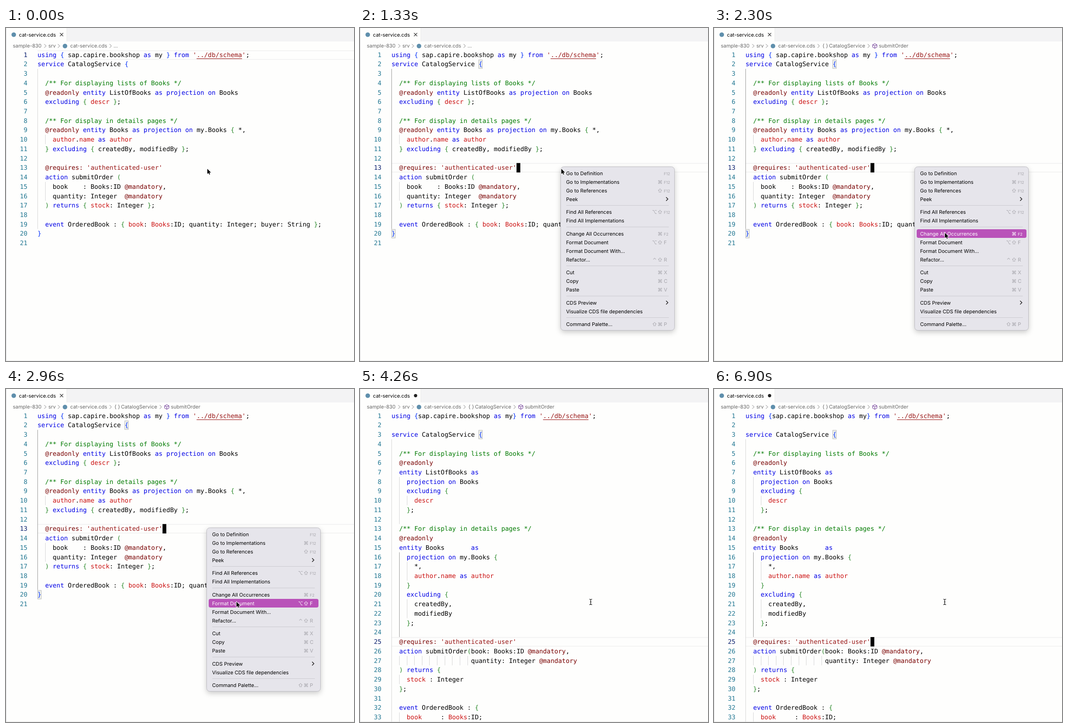
Recreate the animation shown at these times as an HTML page. Size 764 by 733 pixels, loop 6.93 s.

```html
<!DOCTYPE html>
<html lang="en">
<head>
<meta charset="utf-8">
<title>Format document</title>
<style>
  html, body { margin: 0; width: 100%; height: 100%; overflow: hidden; background: #fefefd; }
  svg { display: block; }
  text { text-rendering: geometricPrecision; white-space: pre; }
  .code { font: 13.81px "DejaVu Sans Mono", monospace; }
  .ui { font: 11px Inter, "DejaVu Sans", sans-serif; }
  .num { fill: #237893; text-anchor: end; }
  .num.active { fill: #0b216f; }
  .kw { fill: #0000e6; }
  .rem { fill: #007a00; }
  .ann { fill: #780000; }
  .str { fill: #981515; }
  .ref { fill: #cb1010; }
  .d1 { fill: #0431fa; }
  .d2 { fill: #2b8a2b; }
  .guide { fill: #d6d6d6; }
  .guide.dark { fill: #999; }
  .match { fill: #eef1ee; stroke: #b9b9b9; }
  .crumb { fill: #686868; }
  .thin { fill: none; stroke: #777; }
  .mark { fill: #5f8fac; }
  .panel { fill: #e6e5eb; stroke: #bdbcc2; filter: drop-shadow(0 4px 6px #0003); }
  .key { fill: #a5a4aa; }
  .mod { text-anchor: middle; }
  .arrow { fill: none; stroke: #222; stroke-width: 1.5; }
  .bar { fill: #b952b9; visibility: hidden; }
  .on .bar { visibility: visible; }
  .on text { fill: #fff; }
</style>
</head>
<body>
<svg id="stage" width="764" height="733" viewBox="0 0 764 733"></svg>
<script>
const LOOP = 6930, LEFT = 69.3, CELL = 8.313, TOP = 48.5, ROW = 20.73;
const T = { blink: 560, click: 900, crumbs: 1450, pick: 2980, fade: 3100, gone: 3290, format: 3460 };

const before = `using { sap.capire.bookshop as my } from '../db/schema';
service CatalogService {

  /** For displaying lists of Books */
  @readonly entity ListOfBooks as projection on Books
  excluding { ~descr };

  /** For display in details pages */
  @readonly entity Books as projection on my.Books { *,
    ~author.~name as ~author
  } excluding { createdBy, modifiedBy };

  @requires: 'authenticated-user'
  action submitOrder (
    book    : Books:ID @mandatory,
    quantity: Integer  @mandatory
  ) returns { ~stock: Integer };

  event OrderedBook : { ~book: ~Books:ID; quantity: Integer; buyer: String };
}
`;
const after = `using {sap.capire.bookshop as my} from '../db/schema';

service CatalogService {

  /** For displaying lists of Books */
  @readonly
  entity ListOfBooks as
    projection on Books
    excluding {
      ~descr
    };

  /** For display in details pages */
  @readonly
  entity Books       as
    projection on my.Books {
      *,
      ~author.~name as ~author
    }
    excluding {
      createdBy,
      modifiedBy
    };

  @requires: 'authenticated-user'
  action submitOrder(book: Books:ID @mandatory,
                     quantity: Integer @mandatory
  ) returns {
    ~stock : Integer
  };

  event OrderedBook : {
    ~book     : ~Books:ID;`;

const keywords = /^(using|as|from|service|entity|projection|on|excluding|action|returns|event)$/;
const tokens = /\/\*.*?\*\/|'[^']*'|@\w+:?|~?\w+|[{}()]|[^\s\w{}()@~']+/g;
const x = col => LEFT + col * CELL;
const y = row => TOP + row * ROW;
const text = (px, py, cls, s) => `<text x="${px}" y="${py}" class="${cls}">${s}</text>`;
const rect = (px, py, w, h, attrs) => `<rect x="${px}" y="${py}" width="${w}" height="${h}" ${attrs}/>`;
const group = (id, body) => `<g id="${id}">${body}</g>`;

function codeLines(source) {
  let depth = 0;
  const kind = s => {
    if (/[{(]/.test(s)) return 'd' + ++depth;
    if (/[})]/.test(s)) return 'd' + depth--;
    if (s[0] === '~') return 'ref';
    if (s[0] === '@') return 'ann';
    if (s[0] === "'") return 'str';
    if (s.startsWith('/*')) return 'rem';
    return keywords.test(s) ? 'kw' : '';
  };
  return source.split('\n').map((line, row) => {
    let marks = 0, out = text(47, y(row) + 15.1, 'code num', row + 1);
    for (const m of line.matchAll(tokens)) {
      const px = x(m.index - marks);
      const word = /^\/\*|^'/.test(m[0]) ? m[0] : m[0].replace('~', '');
      // comments and strings stay whole, so only names carry a marker
      const cls = m[0].startsWith('/*') ? 'rem' : m[0][0] === "'" ? 'str' : kind(m[0]);
      out += text(px, y(row) + 15.1, 'code ' + cls, word);
      if (word.includes('../')) out += rect(px + CELL, y(row) + 18.5, 12 * CELL, 1.1, 'class="str"');
      if (m[0][0] === '~') marks++;
    }
    return out;
  }).join('');
}

const guide = (col, from, to, cls = '') =>
  rect(Math.round(x(col)), y(from - 1), 1, (to - from + 1) * ROW, `class="guide ${cls}"`);
const match = (col, row) => rect(x(col) + .2, y(row - 1) + .9, CELL - .4, ROW - 1.8, 'class="match"');

function chrome() {
  const chevron = px => `<path class="thin" d="M${px - 2} 35.5l4 4-4 4"/>`;
  const crumb = (px, s) => text(px, 43.4, 'ui crumb', s);
  return rect(0, 0, 764, 29.5, 'fill="#f3f3f4"') + rect(1, 0, 132.5, 30, 'fill="#fefefd"') +
    rect(133, 0, 1, 29.5, 'fill="#e9e9ea"') + rect(0, 0, 1, 733, 'fill="#dfdfe0"') +
    rect(0, 732, 764, 1, 'fill="#e8e8e8"') +
    '<circle class="mark" cx="17" cy="14.7" r="5"/><circle class="mark" cx="129.5" cy="39.7" r="5"/>' +
    text(28.5, 18.5, 'ui', 'cat-service.cds') +
    group('close', '<path d="M118.5 11l7 7m0-7l-7 7" stroke="#333" stroke-width="1.1"/>') +
    group('dirty', '<circle cx="122" cy="14.6" r="3.6" fill="#222"/>') +
    crumb(15, 'sample-830') + chevron(86) + crumb(93, 'srv') + chevron(116) +
    crumb(141, 'cat-service.cds') + chevron(229.5) +
    group('short', crumb(236, '…')) +
    group('full', crumb(238, '{ }') + crumb(252.5, 'CatalogService') + chevron(339.5) +
      '<path d="M353 34.5l4.7 2.4v5.2L353 44.6l-4.7-2.5v-5.2zM348.3 37l4.7 2.3 4.7-2.3M353 39.3v5.3" fill="none" stroke="#652d90"/>' +
      crumb(362, 'submitOrder'));
}

const items = `Go to Definition| F12
Go to Implementations|⌘ F12
Go to References|⇧ F12
Peek|>
-
Find All References|⌥⇧ F12
Find All Implementations
-
Change All Occurrences|⌘ F2
Format Document|⌥⇧ F
Format Document With...
Refactor...|⌃⇧ R
-
Cut|⌘ X
Copy|⌘ C
Paste|⌘ V
-
CDS Preview|>
Visualize CDS file dependencies
-
Command Palette...|⇧⌘ P`;
const rowTops = [];

function menu() {
  let top = 310, out = rect(440.5, 305.5, 250, 360, 'rx="7" class="panel"');
  for (const item of items.split('\n')) {
    if (item === '-') {
      out += rect(453, top + 4, 225, 1, 'fill="#cbcad0"');
      top += 9.5;
      continue;
    }
    const [label, keys = ''] = item.split('|'), mid = top + 9.5;
    let row = rect(445, top, 241, 19, 'rx="4" class="bar"') + text(452.5, mid + 4, 'ui', label);
    if (keys === '>') row += `<path class="arrow" d="M672 ${mid - 4}l4 4-4 4"/>`;
    else if (keys) {
      const [mods, key] = keys.split(' ');
      [...mods].reverse().forEach((m, i) => row += text(658.7 - 12 * i, mid + 4, 'ui key mod', m));
      const size = key.length > 1 ? 8.5 : 11;
      row += `<text x="667" y="${mid + 4}" class="ui key" style="font-size:${size}px">${key}</text>`;
    }
    out += `<g class="item">${row}</g>`;
    rowTops.push(top);
    top += 19;
  }
  return out;
}

const stage = document.getElementById('stage');
stage.innerHTML = chrome() +
  group('line', rect(69, .5, 700, 1, 'fill="#e9e9e9"') + rect(69, 19.6, 700, 1, 'fill="#e9e9e9"')) +
  group('old', group('idle', guide(0, 3, 19)) +
    group('busy', guide(0, 3, 19, 'dark') + match(23, 2) + match(0, 20)) +
    guide(2, 10, 10) + guide(2, 15, 16) + codeLines(before)) +
  group('neat', guide(0, 4, 33) + guide(2, 8, 12) + guide(2, 16, 24, 'dark') + guide(2, 29, 29) +
    guide(2, 33, 33) + guide(4, 10, 10) + guide(4, 17, 18) + guide(4, 21, 22) +
    Array.from({ length: 10 }, (_, i) => guide(2 + 2 * i, 27, 27)).join('') +
    match(23, 3) + codeLines(after)) +
  group('caret', rect(0, 0, CELL, ROW, '') + '<text id="under" y="15.1" class="code" fill="#fff">;</text>') +
  group('menu', menu()) +
  group('pointer', '<path d="M0 0V11.3L2.6 8.9 4.3 12.8 6 12.1 4.4 8.3H8Z" stroke="#fff" stroke-width="1.6" paint-order="stroke"/>') +
  group('beam', '<path d="M503.5 462.7q3 0 3 2v8q0 2-3 2m6-12q-3 0-3 2m0 8q0 2 3 2m-4.5-6h3" fill="none" stroke="#222" stroke-width="1.2"/>');

const $ = id => document.getElementById(id);
const show = (id, on) => $(id).style.display = on ? '' : 'none';
const move = (id, px, py) => $(id).setAttribute('transform', `translate(${px} ${py})`);
const rows = [...stage.querySelectorAll('.item')];
const nums = id => [...$(id).querySelectorAll('.num')];
const oldNums = nums('old');
nums('neat')[24].classList.add('active');

const path = [[1500, 442, 310], [2230, 507, 451], [2400, 507, 451], [2650, 506, 468.5]];
function pointerAt(t) {
  const next = path.findIndex(p => p[0] > t);
  if (next === 0) return path[0].slice(1);
  if (next < 0) return path[path.length - 1].slice(1);
  const [a, b] = [path[next - 1], path[next]];
  const k = (t - a[0]) / (b[0] - a[0]), e = k * k * (3 - 2 * k);
  return [a[1] + (b[1] - a[1]) * e, a[2] + (b[2] - a[2]) * e];
}

function caretOn(t) {
  if (t < T.fade) return t >= T.blink;
  return t >= T.format && Math.floor((t - T.format) / 500) % 2 === 0;
}

function render(t) {
  const clicked = t >= T.click, neat = t >= T.format;
  show('close', !neat);
  show('dirty', neat);
  show('short', t < T.crumbs);
  show('full', t >= T.crumbs);
  show('old', !neat);
  show('neat', neat);
  show('idle', !clicked);
  show('busy', clicked);
  oldNums.forEach((n, i) => n.classList.toggle('active', i === (clicked ? 12 : 0)));

  const row = neat ? 24 : clicked ? 12 : 0;
  move('line', 0, Math.round(y(row)));
  move('caret', x(clicked ? 33 : 55), y(row));
  show('caret', caretOn(t));
  show('under', !clicked);

  const [px, py] = pointerAt(t);
  move('pointer', px, py);
  show('pointer', !neat);
  show('beam', neat);

  show('menu', clicked && t < T.gone);
  $('menu').style.opacity = Math.min(1, Math.max(0, (T.gone - t) / (T.gone - T.fade)));
  const flash = t >= T.pick && t < T.pick + 60;
  rows.forEach((g, i) =>
    g.classList.toggle('on', !flash && px > 445 && py >= rowTops[i] && py < rowTops[i] + 19));
}

function tick() {
  render(performance.now() % LOOP);
  requestAnimationFrame(tick);
}
tick();
</script>
</body>
</html>
```
